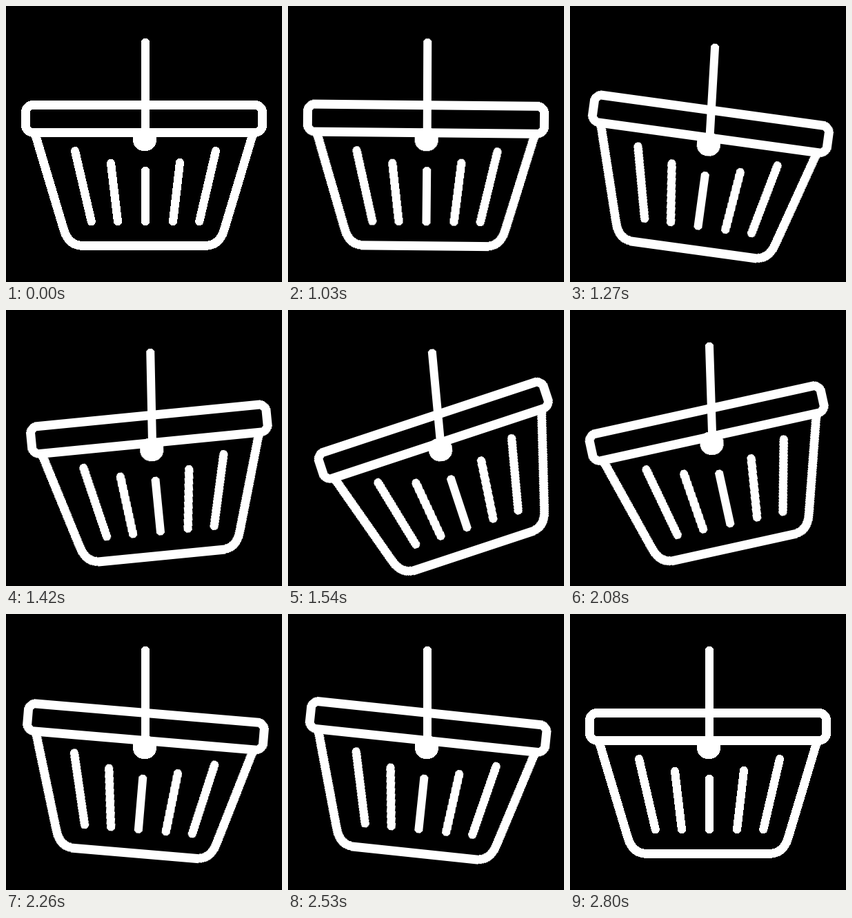
Recreate the animation shown at these times as an HTML page without scripts. Size 400 by 400 pixels, loop 2.83 s.

```html
<!DOCTYPE html>
<html lang="en">
<head>
<meta charset="utf-8">
<title>Swinging basket</title>
<style>
  html, body { margin: 0; width: 100%; height: 100%; overflow: hidden; background: #000; }
  svg { display: block; width: 100vw; height: 100vh; shape-rendering: crispEdges; }
  .line { fill: none; stroke: #fff; stroke-width: 12.2; stroke-linecap: round; stroke-linejoin: round; }
  .frame { stroke-width: 12.7; }
  .drop, .swing, .level, .basket { animation: 2830ms linear infinite; }
  .drop { animation-name: drop; }
  .swing, .level { animation-name: swing; }
  .swing { --dir: 1deg; transform-origin: 202px 53px; }
  /* cancels the handle's tilt at the hinge */
  .level { --dir: -1deg; transform-origin: 201px 193px; }
  .basket { animation-name: tilt; transform-origin: 201px 193px; }

  @keyframes drop {
    0% { transform: translate(0, 0); }
    35.336% { transform: translate(0, 0); animation-timing-function: cubic-bezier(.35, 0, .7, .9); }
    44.876% { transform: translate(8px, 7.7px); animation-timing-function: cubic-bezier(.3, .4, .7, 1); }
    54.417% { transform: translate(7px, 9.7px); animation-timing-function: cubic-bezier(.4, .15, .7, .7); }
    67.138% { transform: translate(1.2px, 3.8px); animation-timing-function: cubic-bezier(.33, .4, .67, 1); }
    73.498%, 100% { transform: translate(0, 0); }
  }
  @keyframes swing {
    0% { transform: rotate(0deg); }
    35.336% { transform: rotate(0deg); animation-timing-function: cubic-bezier(.33, 0, .67, 1); }
    42.756% { transform: rotate(calc(3.9 * var(--dir))); animation-timing-function: cubic-bezier(.33, 0, .67, .665); }
    54.417% { transform: rotate(calc(-5.3 * var(--dir))); animation-timing-function: cubic-bezier(.33, .62, .67, 1); }
    61.484% { transform: rotate(calc(-8.3 * var(--dir))); animation-timing-function: cubic-bezier(.33, 0, .67, 1); }
    78.799%, 100% { transform: rotate(0deg); }
  }
  @keyframes tilt {
    0% { transform: rotate(0deg); }
    35.336% { transform: rotate(0deg); animation-timing-function: cubic-bezier(.33, 0, .67, 1); }
    42.756% { transform: rotate(9.5deg); animation-timing-function: cubic-bezier(.33, 0, .67, .643); }
    54.417% { transform: rotate(-18.2deg); animation-timing-function: cubic-bezier(.33, .6, .67, 1); }
    62.898% { transform: rotate(-30.4deg); animation-timing-function: cubic-bezier(.33, 0, .67, .407); }
    73.498% { transform: rotate(-12.5deg); animation-timing-function: cubic-bezier(.33, .46, .67, 1); }
    83.039% { transform: rotate(8deg); animation-timing-function: cubic-bezier(.33, 0, .67, .625); }
    98.94%, 100% { transform: rotate(0deg); }
  }
</style>
</head>
<body>
<svg viewBox="0 0 400 400">
  <g class="drop">
    <g class="swing">
      <path class="line" d="M202 53V190"/>
      <circle cx="201" cy="193" r="17.4" fill="#fff"/>
      <g class="level">
        <g class="basket line">
          <g class="frame">
            <rect x="28.2" y="143.2" width="343.6" height="40.4" rx="11.5"/>
            <path d="M43 188L84 325Q91 347.5 112 347.5H288Q309 347.5 316 325L357 188"/>
          </g>
          <path d="M100 210L123.8 312.4M152 228L162 312.4M202 239V312.4M252 227L242 312.4M304 210L280.2 312.4"/>
        </g>
      </g>
    </g>
  </g>
</svg>
</body>
</html>
```
